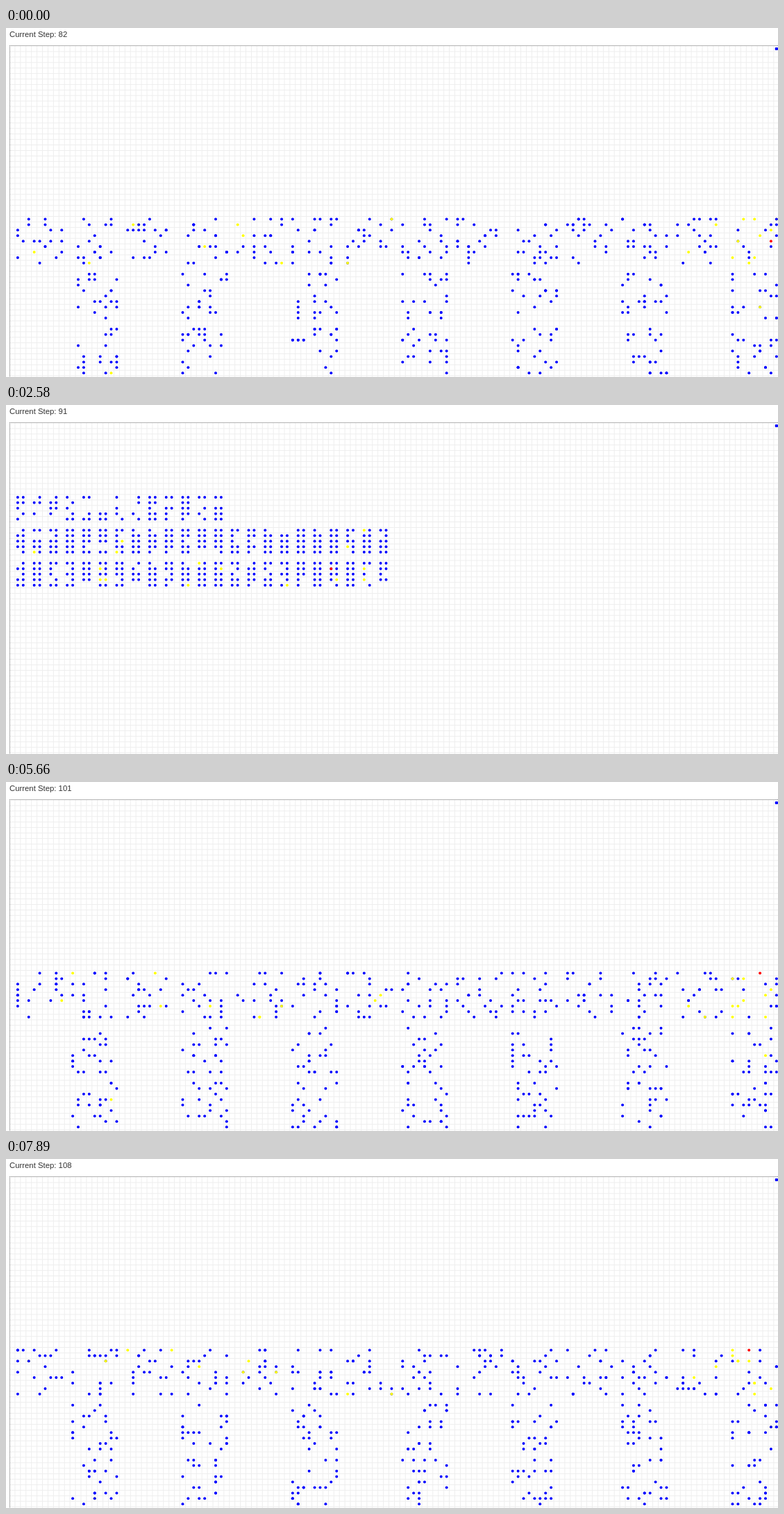
An HTML page with a canvas that plays this animation: 1112x503 px, repeating every 8 s.

```html
<!DOCTYPE html>
<html lang="en">
<head>
<meta charset="utf-8">
<style>
  html, body { margin: 0; width: 100%; height: 100%; overflow: hidden; background: #fff; }
  canvas { position: absolute; left: 0; top: 0; }
  #label { position: absolute; left: 5px; top: 3px; font: 11.35px/13px Arial, "Liberation Sans", sans-serif; color: #333; white-space: pre; }
</style>
</head>
<body>
<canvas id="stage" width="1112" height="503"></canvas>
<div id="label"></div>
<script>
const ctx = document.getElementById('stage').getContext('2d');
const label = document.getElementById('label');
const W = 1112, H = 503, LEFT = 5, TOP = 26, CELL = 7.92;
const LOOP = 8000, TICK = 171.5, STEPS_PER_TICK = .569, FIRST_STEP = 82;
const ROOMS = 14, ROOM_SIZE = 9, ROOM_PEOPLE = 20;

function randomFrom(seed) {
  return () => {
    seed = seed + 0x6D2B79F5 | 0;
    let x = Math.imul(seed ^ seed >>> 15, 1 | seed);
    x = x + Math.imul(x ^ x >>> 7, 61 | x) ^ x;
    return ((x ^ x >>> 14) >>> 0) / 4294967296;
  };
}

function dot(col, row, color) {
  ctx.fillStyle = color;
  ctx.beginPath();
  ctx.arc(LEFT + (col + .5) * CELL, TOP + (row + .5) * CELL, 2, 0, 7);
  ctx.fill();
}

function line(x1, y1, x2, y2) {
  ctx.beginPath();
  ctx.moveTo(x1, y1);
  ctx.lineTo(x2, y2);
  ctx.stroke();
}

function drawGrid() {
  ctx.fillStyle = '#fff';
  ctx.fillRect(0, 0, W, H);
  ctx.strokeStyle = '#eee';
  for (let x = LEFT + CELL; x < W; x += CELL) line(x, TOP, x, H);
  for (let y = TOP + CELL; y < H; y += CELL) line(LEFT, y, W, y);
  ctx.strokeStyle = '#666';
  ctx.setLineDash([1, 1]);
  line(LEFT, 25.5, W, 25.5);
  line(5.5, 25, 5.5, H);
  ctx.setLineDash([]);
}

// Three rows of two-by-five homes; the first row is only partly let.
function drawHomes(random) {
  for (let band = 0; band < 3; band++)
    for (let home = 0; home < (band ? 23 : 13); home++)
      for (let seat = 0; seat < 10; seat++) {
        const taken = random() < (band ? .87 : .6);
        const color = random() < .04 ? 'yellow' : 'blue';
        if (taken) dot(1 + home * 3 + seat % 2, 13 + band * 6 + (seat >> 1), color);
      }
  dot(58, 26, 'red');
}

// Large rooms where people mill about; most of the sick share the last one.
function drawRooms(random) {
  const health = randomFrom(7);
  const place = () => Math.floor(random() * ROOM_SIZE);
  for (let band = 0; band < 3; band++)
    for (let room = band ? 1 : 0; room < ROOMS; room += band ? 2 : 1) {
      const lastRoom = room === ROOMS - 1;
      const risk = band ? (lastRoom ? .06 : .004) : (lastRoom ? .4 : .06);
      for (let i = 0; i < ROOM_PEOPLE; i++)
        dot(1 + room * 10 + place(), 31 + band * 10 + place(), health() < risk ? 'yellow' : 'blue');
      if (lastRoom && !band) dot(1 + room * 10 + place(), 31 + place(), 'red');
    }
}

function draw(step) {
  const random = randomFrom(step * 977 + 5);
  label.textContent = 'Current Step: ' + step;
  drawGrid();
  for (let i = 0; i < 5; i++) dot(139, 0, 'blue');
  if (step % 8 === 3) drawHomes(random); else drawRooms(random);
}

let shown;
function animate() {
  const tick = Math.floor((performance.now() % LOOP + 8) / TICK);
  const step = FIRST_STEP + Math.floor(.71 + tick * STEPS_PER_TICK);
  if (step !== shown) draw(shown = step);
  requestAnimationFrame(animate);
}
animate();
</script>
</body>
</html>
```
